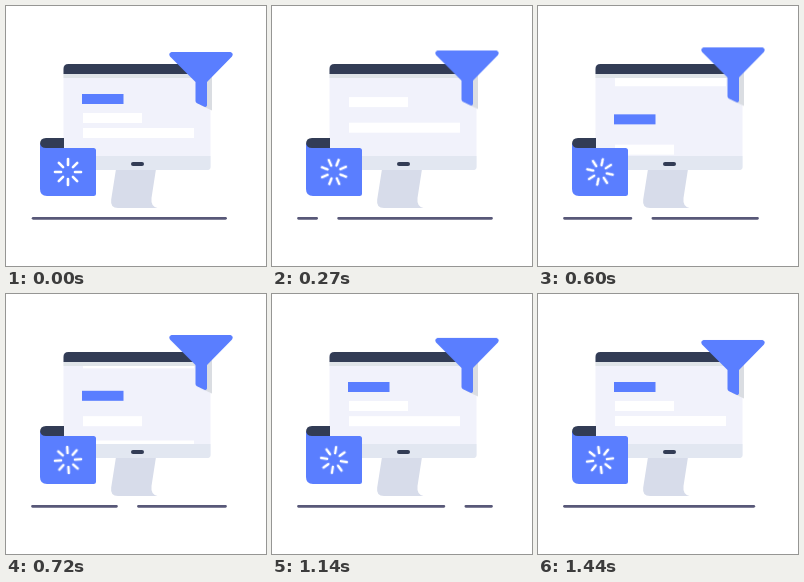
An HTML page for the animation above (1.47 s loop, 260 by 260 pixels).

```html
<!DOCTYPE html>
<html lang="en">
<head>
<meta charset="utf-8">
<title>Data filter</title>
<style>
  html, body { margin: 0; width: 100%; height: 100%; overflow: hidden; background: #fff; }
  svg { display: block; width: 260px; height: 260px; }
  .blue { fill: #5a7eff; }
  .dark { fill: #323c55; }
  #spinner { transform-origin: 62px 166px; }
</style>
</head>
<body>
<svg viewBox="0 0 260 260">
  <defs>
    <clipPath id="view"><rect x="57.5" y="72" width="147" height="78"/></clipPath>
  </defs>

  <!-- monitor -->
  <path fill="#d7dcea" d="M110 163H150L145.5 192Q144.500 200.500 151.500 202H112Q104 202 105.200 193.500Z"/>
  <rect x="57.500" y="58" width="147" height="106" rx="4" fill="#f1f2fb"/>
  <path fill="#e2e7f1" d="M57.500 150H204.500V161Q204.500 164 201.500 164H60.500Q57.500 164 57.500 161Z"/>
  <path class="dark" d="M57.500 68V63Q57.500 58 62.500 58H199.500Q204.500 58 204.500 63V68Z"/>
  <rect x="57.500" y="68" width="147" height="4" fill="#dfe4e8"/>
  <rect class="dark" x="125" y="156" width="13" height="4" rx="2"/>
  <g id="bars" clip-path="url(#view)"></g>

  <!-- book -->
  <path class="dark" d="M34 142V138Q34 132 40 132H58V143H34Z"/>
  <path class="blue" d="M34 137Q34.500 142 40 142H87.500Q90 142 90 144.500V187.500Q90 190 87.500 190H41Q34 190 34 183Z"/>
  <g id="spinner" stroke="#fff" stroke-width="2.600" stroke-linecap="round"></g>

  <!-- funnel -->
  <g id="funnel">
    <path fill="#dadde2" d="M194 70H206V104.500L194 99Z"/>
    <path class="blue" d="M165.500 46H224.500Q228 47 226 50.500L201 76V99.500Q200.500 101.500 198.500 100.800L191 97.200Q189.500 96.500 189.500 95V76L164 50.500Q162 47 165.500 46Z"/>
  </g>

  <line id="ground" x1="26.500" y1="212.300" x2="219.500" y2="212.300" stroke="#585878"
        stroke-width="2.800" stroke-linecap="round" stroke-dasharray="193 22"/>
</svg>
<script>
  const LOOP = 1470;
  const GLIDE = 'cubic-bezier(.37, 0, .28, 1)';
  const SINE = 'cubic-bezier(.364, 0, .636, 1)';
  const $ = id => document.getElementById(id);

  function add(parent, tag, attrs) {
    const el = document.createElementNS('http://www.w3.org/2000/svg', tag);
    for (const k in attrs) el.setAttribute(k, attrs[k]);
    return parent.appendChild(el);
  }

  const clips = [];
  function loop(el, frames) {
    clips.push(el.animate(frames, { duration: LOOP, iterations: Infinity }));
  }

  const shift = y => `translateY(${y}px)`;

  // Hold, glide between two offsets, hold until the loop ends.
  function glide(el, from, to, start, length) {
    loop(el, [
      { transform: shift(from), offset: 0 },
      { transform: shift(from), offset: start / LOOP, easing: GLIDE },
      { transform: shift(to), offset: (start + length) / LOOP },
      { transform: shift(to), offset: 1 }
    ]);
  }

  // Each bar leaves upward while its copy rises from below.
  [
    { x: 76, y: 88, width: 41.5, fill: '#5a7eff' },
    { x: 77, y: 107, width: 59, fill: '#fff' },
    { x: 77, y: 122, width: 111, fill: '#fff' }
  ].forEach((bar, i) => {
    const attrs = { ...bar, height: 10 };
    const delay = i * 75;
    glide(add($('bars'), 'rect', attrs), 0, -60, delay, 735);
    glide(add($('bars'), 'rect', attrs), 62, 0, delay + 235, 800);
  });

  for (let a = 0; a < 360; a += 45) {
    add($('spinner'), 'line', { x1: 62, y1: 159, x2: 62, y2: 153, transform: `rotate(${a} 62 166)` });
  }

  loop($('spinner'), [{ transform: 'rotate(0deg)' }, { transform: 'rotate(360deg)' }]);
  loop($('funnel'), [
    { transform: shift(0), easing: SINE },
    { transform: shift(-5), easing: SINE },
    { transform: shift(0) }
  ]);
  loop($('ground'), [{ strokeDashoffset: '-0.5px' }, { strokeDashoffset: '-215.5px' }]);

  const now = document.timeline.currentTime || 0;
  clips.forEach(c => { c.startTime = now; });
</script>
</body>
</html>
```
